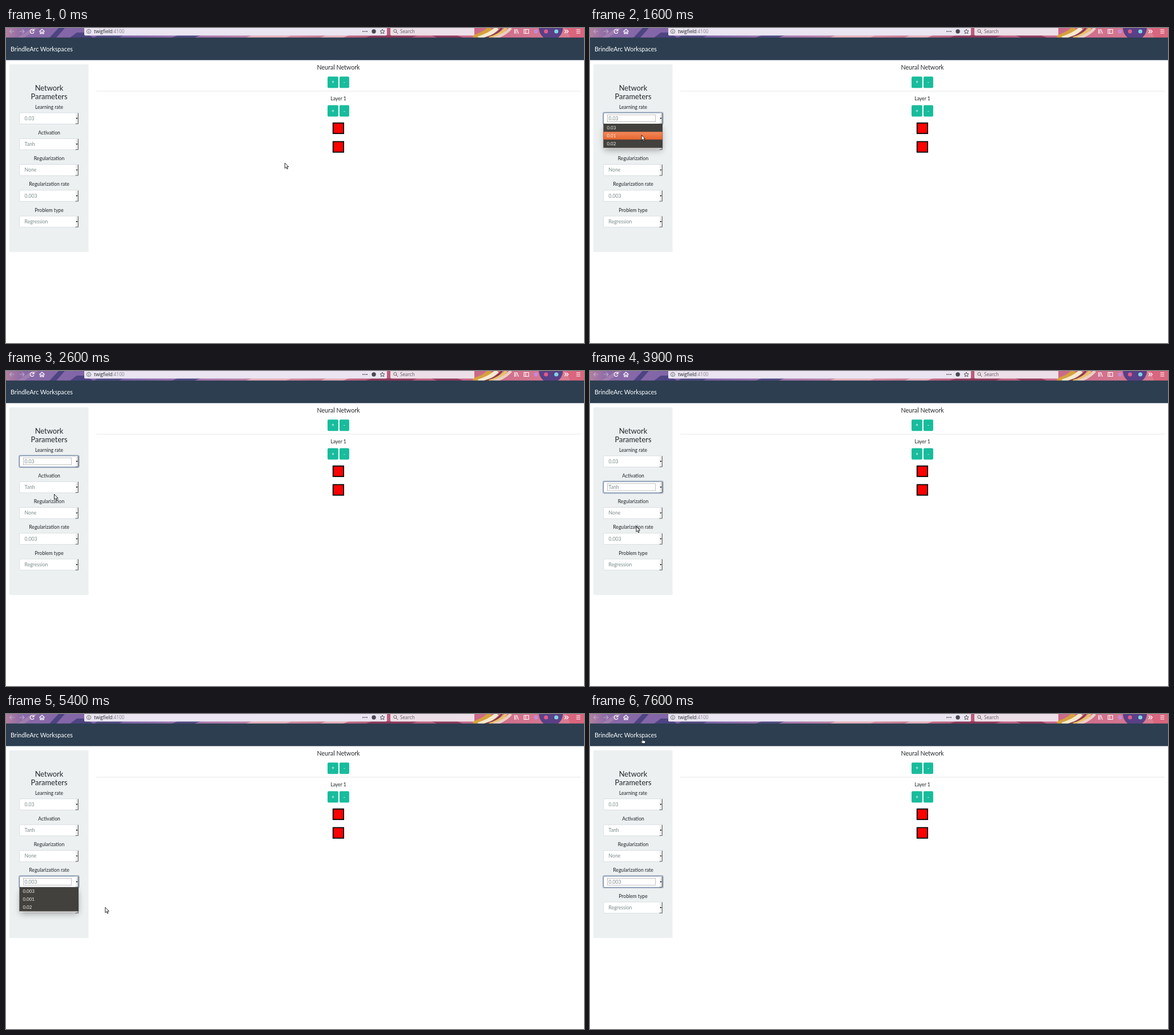
An HTML page for the animation above (8 s loop, 1012x553 px).

```html
<!DOCTYPE html>
<html lang="en">
<head>
<meta charset="utf-8">
<title>Network parameters</title>
<style>
  html, body { margin: 0; width: 100%; height: 100%; overflow: hidden; background: #fff; }
  svg { display: block; width: 100vw; height: 100vh; }
  text { font-family: Lato, "Open Sans", sans-serif; font-size: 8.6px; fill: #212529; }
  .mid { text-anchor: middle; }
  .ui { font-family: "Open Sans", "Noto Sans", sans-serif; font-size: 8.2px; }
</style>
</head>
<body>
<svg id="stage" viewBox="0 0 1012 553" preserveAspectRatio="none">
  <defs>
    <linearGradient id="theme">
      <stop offset="0" stop-color="#b27f9f"/>
      <stop offset=".03" stop-color="#8a6aa8"/>
      <stop offset=".2" stop-color="#7c62a8"/>
      <stop offset=".34" stop-color="#a878ae"/>
      <stop offset=".5" stop-color="#d28a9f"/>
      <stop offset=".64" stop-color="#b85a78"/>
      <stop offset=".8" stop-color="#c9688a"/>
      <stop offset="1" stop-color="#dc7f92"/>
    </linearGradient>
    <linearGradient id="hot" x2="0" y2="1">
      <stop offset="0" stop-color="#f18a5c"/>
      <stop offset="1" stop-color="#e8662f"/>
    </linearGradient>
    <linearGradient id="knob">
      <stop offset="0" stop-color="#fbfbfb"/>
      <stop offset="1" stop-color="#dcdcdc"/>
    </linearGradient>
    <filter id="soft" x="-30%" y="-60%" width="160%" height="220%"><feGaussianBlur stdDeviation="6"/></filter>
    <clipPath id="bar"><rect width="1012" height="17"/></clipPath>
  </defs>
</svg>
<script>
const LOOP = 8000, TICK = 100;
const stage = document.getElementById('stage');

function add(parent, tag, attrs = {}, label) {
  const el = document.createElementNS('http://www.w3.org/2000/svg', tag);
  for (const key in attrs) el.setAttribute(key, attrs[key]);
  if (label !== undefined) el.textContent = label;
  parent.appendChild(el);
  return el;
}
const group = (parent, attrs) => add(parent, 'g', attrs);
const rect = (parent, x, y, width, height, fill, more) =>
  add(parent, 'rect', { x, y, width, height, fill, ...more });
const path = (parent, d, fill, more) => add(parent, 'path', { d, fill, ...more });
const circle = (parent, cx, cy, r, fill, more) => add(parent, 'circle', { cx, cy, r, fill, ...more });
const text = (parent, x, y, label, more) => add(parent, 'text', { x, y, ...more }, label);
const line = (parent, d, color, width = 1) =>
  path(parent, d, 'none', { stroke: color, 'stroke-width': width });
const show = (el, on) => el.setAttribute('visibility', on ? 'visible' : 'hidden');

function drawBrowser() {
  const g = group(stage, { 'clip-path': 'url(#bar)' });
  rect(g, 0, 0, 1012, 17, 'url(#theme)');
  path(g, 'M76 17L92 0H103L88 17ZM112 17L124 8H140L152 17Z', '#4d4482');
  path(g, 'M20 17L46 0H56L32 17Z', '#b08ab2', { opacity: .6 });
  path(g, 'M160 13H205L198 17H155ZM300 13H340L330 17H290Z', '#514a82');
  path(g, 'M430 13H500L490 17H420ZM560 13H600L590 17H550Z', '#e6b0ba');
  path(g, 'M640 13H720L710 17H630ZM745 13H790L800 17H755Z', '#8f3a5c');

  line(g, 'M818 17Q838 12 848 0', '#d6a13c', 9);
  line(g, 'M827 18Q848 12 860 0', '#f6ead0', 7);
  line(g, 'M838 18Q860 12 868 0', '#8c3847', 3);
  line(g, 'M846 18Q866 12 876 0', '#e9c06a', 5);
  line(g, 'M854 18Q874 12 884 0', '#eccfc4', 5);
  path(g, 'M980 0H1012V17H988Z', '#d9667e');
  circle(g, 954, 0, 21, '#594087');

  rect(g, 137, -3, 530, 16.3, '#eae5f1', { rx: 2 });
  rect(g, 673, -3, 147, 16.3, '#eddfe7', { rx: 2 });

  const faded = '#bda8c6';
  line(g, 'M14.5 6H6.5M10 2.5L6.5 6L10 9.5', faded, 1.2);
  line(g, 'M24 6H32M28.5 2.5L32 6L28.5 9.5', faded, 1.2);
  line(g, 'M48.5 3.8A3.5 3.5 0 1 0 49 7.3M49 1.8V4.8H46', '#fff', 1.2);
  line(g, 'M58.5 6.2L63 2L67.5 6.2M60 5.5V9.8H62V7H64V9.8H66V5.5', '#fff', 1.2);

  circle(g, 145, 6, 3.6, 'none', { stroke: '#555', 'stroke-width': .8 });
  line(g, 'M145 5.2V8.2M145 3.6V4.4', '#555', .9);
  const address = text(g, 154, 9, '', { class: 'ui' });
  add(address, 'tspan', {}, 'twigfield');
  add(address, 'tspan', { fill: '#85808d' }, ':4100');

  for (const x of [625.2, 628.5, 631.8]) circle(g, x, 6, 1, '#444');
  circle(g, 644, 6, 3.7, '#4a4a52');
  path(g, 'M659 2L660.2 4.8L663 5L660.9 7L661.6 9.8L659 8.3L656.4 9.8L657.1 7L655 5L657.8 4.8Z',
    'none', { stroke: '#444', 'stroke-width': .9 });
  circle(g, 681.3, 5.2, 2.6, 'none', { stroke: '#555', 'stroke-width': .9 });
  line(g, 'M683.2 7.1L686 10', '#555', 1);
  text(g, 690, 9, 'Search', { class: 'ui', style: 'fill:#5f5a64' });

  line(g, 'M890.5 2V10M892.8 2V10M894.5 2.3L897.2 10', '#fff', 1.1);
  line(g, 'M907 2.5H915V9.5H907ZM910 2.5V9.5', '#fff', 1.1);
  circle(g, 928, 6, 3.7, '#c78ad0');
  circle(g, 945.5, 6, 3.6, '#e05b88');
  circle(g, 963.5, 6, 3.6, '#80d3e4');
  line(g, 'M978 3L981 6L978 9M981.5 3L984.5 6L981.5 9', '#fff', 1.1);
  line(g, 'M998.5 3H1005.5M998.5 6H1005.5M998.5 9H1005.5', '#fff', 1.1);

  rect(stage, 0, 16.7, 1012, 39.7, '#2c3e50');
  text(stage, 8, 41, 'BrindleArc Workspaces', { style: 'font-size:10.7px;fill:#fff' });
}

function drawNetwork() {
  text(stage, 582, 73.2, 'Neural Network', { class: 'mid', style: 'font-size:10.7px' });
  rect(stage, 158, 110.5, 848, .8, '#e2e2e2');
  text(stage, 582, 127.4, 'Layer 1', { class: 'mid' });
  for (const y of [85.2, 135.6]) {
    [['+', 563, 18.8], ['-', 583.9, 17]].forEach(([sign, x, width]) => {
      rect(stage, x, y, width, 20, '#18bc9c', { rx: 2 });
      text(stage, x + width / 2, y + 13, sign, { class: 'mid', style: 'fill:#fff' });
    });
  }
  for (const y of [166.8, 199.5])
    rect(stage, 572.7, y, 18.4, 18.4, '#f00', { stroke: '#000', 'stroke-width': 1.8 });
}

function drawField(name, value, index) {
  const g = group(stage, { transform: `translate(0 ${45.3 * index})` });
  text(g, 75.5, 141.6, name, { class: 'mid' });
  const ring = group(g);
  rect(ring, 22.7, 148, 105.4, 21.4, 'none', { rx: 2.6, stroke: '#b1bbc8', 'stroke-width': 1.6 });
  rect(g, 23.6, 148.9, 103.4, 19.6, '#fff', { rx: 2, stroke: '#ced4da', 'stroke-width': .7 });
  const edge = rect(g, 23.6, 148.9, 103.4, 19.6, 'none', { rx: 2, stroke: '#5f7a9e', 'stroke-width': .9 });
  text(g, 32.6, 161.8, value, { style: 'fill:#7b8a8b' });
  rect(g, 121.2, 149.4, 5.2, 18.5, 'url(#knob)');
  line(g, 'M121.5 168.2H126.4V149.2', '#666', 1);
  path(g, 'M122.3 157.8H125.7L124 160Z', '#111');
  const outline = rect(g, 30.5, 152.5, 84, 12.2, 'none', { stroke: '#a6a6a6', 'stroke-width': .7 });
  return { ring, edge, outline };
}

function drawPopup(index, values) {
  const g = group(stage, { transform: `translate(0 ${45.3 * index})` });
  rect(g, 25, 175, 101, 40, '#000', { filter: 'url(#soft)', opacity: .3 });
  rect(g, 23.4, 168, 103.7, 42.4, '#42413d');
  const rows = values.map((value, i) => {
    const y = 168.4 + 13.8 * i;
    const hot = rect(g, 23.7, y, 103.1, 13.6, 'url(#hot)', { stroke: '#c9552a', 'stroke-width': .5 });
    text(g, 29.5, y + 10, value, { style: 'font-size:8px;fill:#f5f3ee' });
    return hot;
  });
  return { g, rows };
}

drawBrowser();
rect(stage, 6, 63.7, 138.6, 329.5, '#ecf0f1', { rx: 2 });
text(stage, 75.5, 110, 'Network', { class: 'mid', style: 'font-size:12.9px' });
text(stage, 75.5, 125, 'Parameters', { class: 'mid', style: 'font-size:12.9px' });
drawNetwork();

const fields = [
  ['Learning rate', '0.03'], ['Activation', 'Tanh'], ['Regularization', 'None'],
  ['Regularization rate', '0.003'], ['Problem type', 'Regression']
].map(([name, value], i) => drawField(name, value, i));

const ratePopup = drawPopup(0, ['0.03', '0.01', '0.02']);
const regPopup = drawPopup(3, ['0.003', '0.001', '0.02']);

const ink = { stroke: '#111', 'stroke-width': .9, 'stroke-linejoin': 'round' };
const arrow = path(stage, 'M0 .4V9.8L2.2 7.8L3.7 11.2L5.2 10.5L3.7 7.2H6.6Z', '#fff', ink);
const hand = path(stage, 'M3 .8Q4.2.2 4.4 1.4V3.6L8 4.2Q8.8 4.5 8.7 5.5L8 8.6H3.8L1 5.7Q.9 4.7 2 4.9L3 5.6Z',
  '#fff', { ...ink, 'stroke-width': .7 });

// Pointer moves: start, number of ticks, end point.
const moves = [
  [300, 3, 176.5, 190], [700, 6, 98.2, 157], [1500, 5, 84.5, 209], [2000, 4, 74.5, 228],
  [2500, 2, 84.5, 216], [3900, 1, 81, 272.5], [4300, 1, 79, 274], [4700, 1, 77.5, 294.5],
  [5000, 1, 113, 341.5], [5400, 1, 173.8, 339], [5800, 1, 138.5, 289.5], [6400, 1, 76.5, 113.5],
  [6800, 1, 119.5, 112.5], [7200, 1, 93.5, 61.5], [7600, 1, 88.2, 43]
];

function pointerAt(t) {
  let x = 488.2, y = 236.5;
  for (const [start, ticks, endX, endY] of moves) {
    if (t < start) break;
    const p = Math.min(1, (Math.floor((t - start) / TICK) + 1) / ticks);
    const eased = Math.sin(p * Math.PI / 2);
    x += (endX - x) * eased;
    y += (endY - y) * eased;
  }
  return { x, y };
}

function setPopup(popup, open, fading, hotRow) {
  popup.g.setAttribute('display', open ? 'inline' : 'none');
  popup.g.setAttribute('opacity', fading ? .76 : 1);
  popup.rows.forEach((row, i) => row.setAttribute('opacity', i === hotRow ? 1 : 0));
}

function draw(t) {
  const within = (from, to) => t >= from && t < to;
  const { x, y } = pointerAt(t);
  const focused = within(1400, 3900) ? 0 : within(3900, 4300) ? 1 : t >= 4700 ? 3 : -1;
  const fadingRate = within(1400, 1500), fadingReg = within(4700, 5000);

  fields.forEach(({ ring, edge, outline }, i) => {
    const lit = i === focused && !fadingRate && !fadingReg;
    show(ring, lit);
    show(edge, lit);
    show(outline, i === focused);
  });

  const rateRow = y > 210.5 ? -1 : Math.max(0, Math.floor((y - 168.4) / 13.8));
  setPopup(ratePopup, within(1400, 2500), fadingRate, rateRow);
  setPopup(regPopup, within(4700, 5800), fadingReg, fadingReg ? 0 : t < 5400 ? 2 : -1);

  const overLink = t >= 7600;
  show(arrow, !overLink);
  show(hand, overLink);
  (overLink ? hand : arrow).setAttribute('transform', `translate(${x} ${y})`);
}

function frame() {
  draw(performance.now() % LOOP);
  requestAnimationFrame(frame);
}
frame();
</script>
</body>
</html>
```
